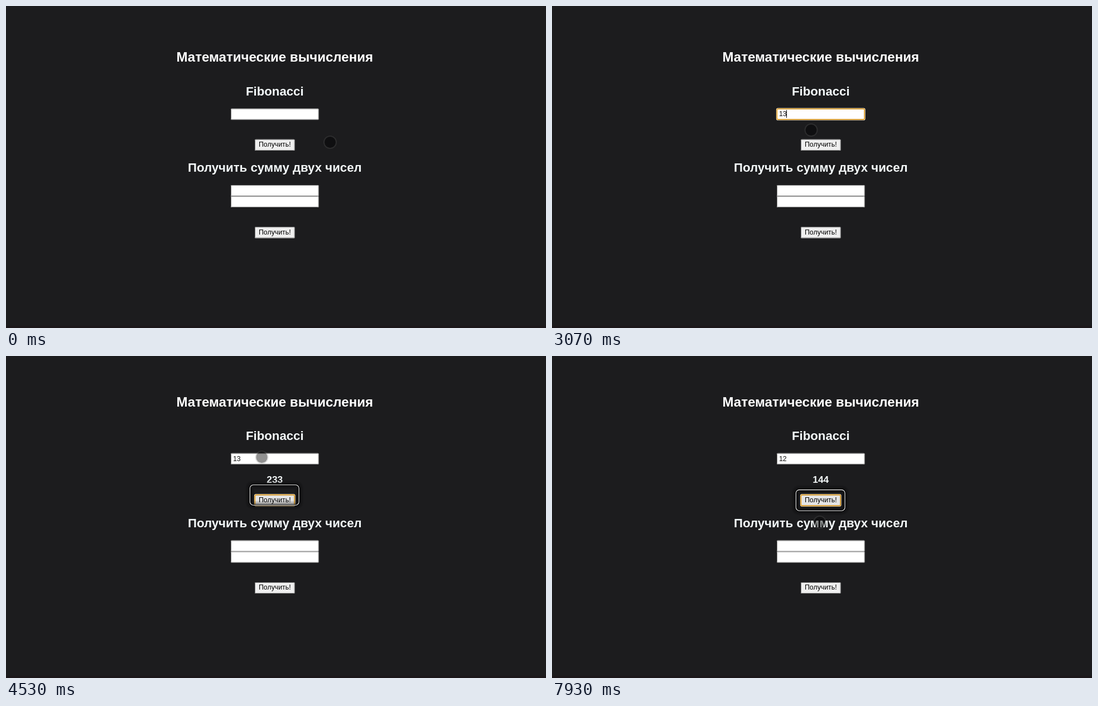
An HTML page with a canvas for the animation above (8000 ms loop, 968 by 579 pixels).

```html
<!DOCTYPE html>
<html lang="ru">
<head>
<meta charset="utf-8">
<title>Математические вычисления</title>
<style>
  html, body { margin: 0; width: 100%; height: 100%; overflow: hidden; background: #1c1c1e; }
  canvas { display: block; }
</style>
</head>
<body>
<canvas id="stage" width="968" height="579"></canvas>
<script>
const ctx = document.getElementById('stage').getContext('2d');
const LOOP = 8000;
const MID = 481.8;
const SHIFT = 9.7;
const FONT = '"Liberation Sans", Arial, sans-serif';
const ZOOM = 0.926;
const SIZE = { title: 26 * ZOOM, head: 24 * ZOOM, result: 18.72 * ZOOM, control: 13.333 * ZOOM };

// Pointer path: time, x, y
const path = [
  [67, 581, 245], [200, 572, 238], [330, 530, 200], [470, 480, 159],
  [530, 464, 157], [600, 456, 170], [730, 457, 196], [800, 460, 203],
  [2860, 460, 203], [3330, 471, 252], [4067, 471, 252], [4530, 458.5, 182],
  [6000, 458.5, 182], [6530, 474, 253], [6670, 477, 257],
  [7730, 477, 257], [7930, 480, 299]
];

const within = (t, a, b) => t >= a && t < b;
const ramp = (t, a, b) => Math.min(1, Math.max(0, (t - a) / (b - a)));
const smooth = k => k * k * (3 - 2 * k);

function pointerAt(t) {
  let i = 0;
  while (i < path.length - 2 && t > path[i + 1][0]) i++;
  const [t0, x0, y0] = path[i];
  const [t1, x1, y1] = path[i + 1];
  let k = ramp(t, t0, t1);
  if (t1 - t0 > 400) k = smooth(k);
  return [x0 + (x1 - x0) * k, y0 + (y1 - y0) * k];
}

function box(x, y, w, h, r) {
  ctx.beginPath();
  ctx.roundRect(x, y, w, h, r);
}

function outline(x, y, w, h, r, color, width) {
  box(x, y, w, h, r);
  ctx.strokeStyle = color;
  ctx.lineWidth = width;
  ctx.stroke();
}

function text(str, x, y, size, color, weight = 'normal', align = 'center') {
  ctx.font = `${weight} ${size}px ${FONT}`;
  ctx.textAlign = align;
  ctx.fillStyle = color;
  ctx.fillText(str, x, y);
}

function control(x, y, w, h, fill, focused) {
  box(x, y, w, h, 1.5);
  ctx.fillStyle = fill;
  ctx.fill();
  outline(x + 0.5, y + 0.5, w - 1, h - 1, 1.5, '#767676', 0.9);
  if (focused) {
    outline(x - 0.5, y - 0.5, w + 1, h + 1, 2.5, '#fff3dc', 1.2);
    outline(x + 0.4, y + 0.4, w - 0.8, h - 0.8, 2, '#e59a12', 1.5);
  }
}

function field(y, value = '', focused = false, caret = false) {
  control(403, y, 157.6, 20, '#fff', focused);
  text(value, 407, y + 13.8, SIZE.control, '#111', 'normal', 'left');
  if (caret) {
    ctx.fillStyle = '#000';
    ctx.fillRect(value ? 407 + Math.round(ctx.measureText(value).width) - 1 : 407, y + 2.6, 1, 14);
  }
}

function button(y, focused = false, fill = '#efefef') {
  control(446, y, 71.6, 20.2, fill, focused);
  text('Получить!', MID, y + 13.5, SIZE.control, '#000');
}

function halo(x, y, w, h, alpha) {
  if (alpha <= 0) return;
  ctx.globalAlpha = alpha;
  for (const width of [8, 12, 16]) outline(x, y, w, h, 6, 'rgba(0,0,0,0.1)', width);
  outline(x, y, w, h, 6, 'rgba(0,0,0,0.6)', 4.5);
  outline(x, y, w, h, 6, '#f4f4f4', 1.1);
  ctx.globalAlpha = 1;
}

function pointer(x, y) {
  ctx.beginPath();
  ctx.arc(x, y, 10.2, 0, 7);
  ctx.fillStyle = 'rgba(0,0,0,0.43)';
  ctx.fill();
  ctx.beginPath();
  ctx.arc(x, y, 11, 0, 7);
  ctx.strokeStyle = 'rgba(110,110,110,0.21)';
  ctx.lineWidth = 2;
  ctx.stroke();
}

function fieldValue(t) {
  if (t < 2600) return '';
  if (t < 2670) return '1';
  if (t < 5470) return '13';
  return t < 5530 ? '1' : '12';
}

function draw(t) {
  const step = Math.floor((t + 4) * 0.015) / 0.015;
  const open = t >= 3800;
  const d = open ? SHIFT : 0;
  const inField = within(t, 1000, 3670) || within(t, 4930, 7070);
  const blinkOff = within(t, 1530, 2000) || within(t, 3200, 3670) || within(t, 6070, 6530);
  const onButton = within(t, 3670, 4930) || t >= 7070;
  const pressed = within(t, 3670, 3800) || within(t, 7070, 7130);

  ctx.fillStyle = '#1c1c1e';
  ctx.fillRect(0, 0, 968, 579);
  ctx.fillStyle = '#1b171a';
  ctx.fillRect(0, 575, 968, 4);

  text('Математические вычисления', MID, 100.3 - d, SIZE.title, '#fff', 'bold');
  text('Fibonacci', MID, 160.6 - d, SIZE.head, '#f4f9fa', 'bold');
  field(184.5 - d, fieldValue(t), inField, inField && !blinkOff);
  if (open) text(t < 7200 ? '233' : '144', MID, 227.9, SIZE.result, '#f4f9fa', 'bold');
  button(239.7 + d, onButton, pressed ? '#f5f5f5' : onButton ? '#e5e5e5' : '#efefef');

  text('Получить сумму двух чисел', MID, 298.2 + d, SIZE.head, '#f4f9fa', 'bold');
  field(321.9 + d);
  field(341.9 + d);
  button(397.2 + d);

  if (t < 4930) halo(437.3, 231.8, 87.8, 36.4, ramp(step, 3790, 3930));
  else if (t < 7070) halo(394.3, 166, 175, 36.8, ramp(step, 4867, 5000) * (1 - ramp(step, 6270, 6620)));
  else halo(437.3, 240.6, 87.8, 37.6, ramp(step, 7090, 7260));

  pointer(...pointerAt(step));
}

const start = performance.now();
function tick() {
  draw((performance.now() - start) % LOOP);
  requestAnimationFrame(tick);
}
tick();
</script>
</body>
</html>
```
